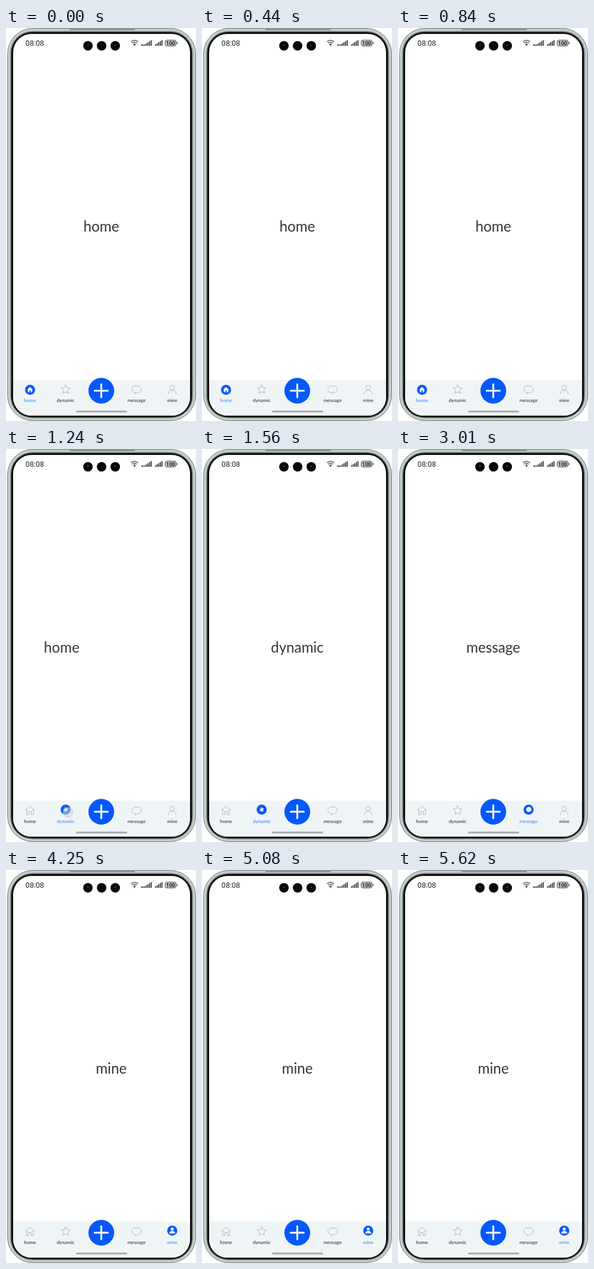
An HTML page for the animation above (5700 ms loop, 320 by 662 pixels).

```html
<!DOCTYPE html>
<html lang="en">
<head>
<meta charset="utf-8">
<title>Tab bar</title>
<style>
  html, body { margin: 0; width: 100%; height: 100%; overflow: hidden; background: #fff; }
  svg { display: block; width: 320px; height: 662px; }
  text { font-family: Lato, sans-serif; text-anchor: middle; }
  .page { font-size: 24.2px; fill: #343537; }
  .label { font-size: 8.2px; fill: #222; }
  .off { fill: none; stroke: #a9adb0; stroke-width: .9; stroke-linejoin: round; stroke-linecap: round; }
  .on { display: none; fill: #fff; }
  .disc { fill: #0a59f7; }
  .active .on { display: inline; }
  .active .off { display: none; }
  .active .label { fill: #2486f5; }
</style>
</head>
<body>
<svg viewBox="0 0 320 662">
  <defs>
    <clipPath id="screen"><rect x="12" y="10" width="298" height="643" rx="31"/></clipPath>
  </defs>

  <!-- phone body -->
  <rect x="2.5" y=".5" width="317" height="661" rx="43" fill="#b3bebb" stroke="#7e8a87"/>
  <rect x="5" y="3" width="312" height="656" rx="40" fill="none" stroke="#c9d2cf" stroke-width="2"/>
  <rect x="7.5" y="5.5" width="307" height="651.5" rx="37" fill="#636a69"/>
  <rect x="9" y="7" width="304" height="648.5" rx="35" fill="#0b0c0c"/>
  <path d="M107 2.5H217" stroke="#6d7775" stroke-width="1.5"/>

  <g clip-path="url(#screen)">
    <rect x="12" y="10" width="298" height="643" fill="#fff"/>
    <g id="pages"></g>
    <rect x="12" y="592.5" width="298" height="61" fill="#eff4f7"/>
  </g>

  <!-- status bar -->
  <text x="48.5" y="30" style="font:12.6px Roboto, sans-serif" fill="#252525">08:08</text>
  <g id="cameras"></g>
  <g fill="none" stroke="#333" stroke-width="1.3">
    <path d="M210.5 23.2Q216.5 18.2 222.500 23.2M212.600 25.600Q216.500 22.300 220.400 25.600M214.600 27.800Q216.500 26.200 218.400 27.800"/>
    <circle cx="216.500" cy="29.300" r=".5"/>
  </g>
  <g id="signal" fill="#333"></g>
  <rect x="268" y="20.300" width="18.500" height="10" rx="3" fill="#c4c6c7" stroke="#555"/>
  <path d="M288.300 23.500V27" stroke="#555" stroke-width="1.300"/>
  <text x="277.300" y="28.500" style="font:bold 9px Roboto, sans-serif" fill="#222">100</text>

  <!-- tabs -->
  <g class="tab" transform="translate(40.500 609)">
    <path class="off" d="M-7.500 -.5L0 -7.300L7.500 -.5M-5.700 -2V7H-2.200V1.500H2.200V7H5.700V-2"/>
    <g class="on" transform="translate(0 .5)">
      <circle class="disc" r="8.500"/>
      <path d="M-5 0L0 -4.700L5 0H3.700V4H1.200V1H-1.200V4H-3.700V0Z"/>
    </g>
  </g>
  <g class="tab" transform="translate(100.500 609)">
    <path class="off star" data-r="7.800"/>
    <g class="on" transform="translate(0 -1.500)">
      <circle class="disc" r="8.500"/>
      <path class="star" data-r="4.500" transform="rotate(-12)"/>
    </g>
  </g>
  <g class="tab" transform="translate(220 609)">
    <path class="off" d="M-2.500 5.200C-10 4.500 -10 -6 -1.500 -6H1.500C10 -6 10 5.200 1.500 5.200L-2 7.300Z"/>
    <g class="on" transform="translate(0 -1.500)">
      <circle class="disc" r="8.500"/>
      <circle cx=".3" cy="-.3" r="4.400" fill="#eaf1fd"/>
    </g>
  </g>
  <g class="tab" transform="translate(280 609)">
    <path class="off" d="M-3.700 -3.200a3.700 3.700 0 1 1 7.400 0a3.700 3.700 0 1 1 -7.400 0M-6.500 7.200C-6.500 -.8 6.500 -.8 6.500 7.200"/>
    <g class="on" transform="translate(0 -1.500)">
      <circle class="disc" r="8.500"/>
      <circle cy="-2.700" r="2.500"/>
      <path d="M-5 4.800C-5 -1 5 -1 5 4.800Z"/>
    </g>
  </g>

  <circle id="touch" r="8" fill="#d8dadb" fill-opacity=".5" stroke="#b9bcbe" stroke-width=".8"/>

  <circle cx="160.500" cy="611" r="21.700" fill="#0558fb"/>
  <path d="M149.500 611H171.500M160.500 600V622" stroke="#fff" stroke-width="3.200" stroke-linecap="round"/>
  <path d="M119.500 646H202.500" stroke="#a4a9ac" stroke-width="3" stroke-linecap="round"/>
</svg>

<script>
const LOOP = 5700, PAGE = 298, SLIDE = 300, PRESS = 40, TOUCH = 160;
const names = ['home', 'dynamic', 'message', 'mine'];
const taps = [1160, 2440, 4010];   // each tap opens the next tab
const tabX = [40.5, 100.5, 220, 280];

const pages = document.getElementById('pages');
const touch = document.getElementById('touch');
const tabs = [...document.querySelectorAll('.tab')];

function add(parent, tag, attrs, content = '') {
  const node = document.createElementNS('http://www.w3.org/2000/svg', tag);
  for (const key in attrs) node.setAttribute(key, attrs[key]);
  node.textContent = content;
  return parent.appendChild(node);
}

names.forEach((name, i) => {
  add(pages, 'text', { class: 'page', x: 160.5 + i * PAGE, y: 343 }, name);
  add(tabs[i], 'text', { class: 'label', y: 20.6 }, name);
});

document.querySelectorAll('.star').forEach(star => {
  const points = Array.from({ length: 10 }, (_, i) => {
    const r = star.dataset.r * (i % 2 ? 0.5 : 1), a = (i / 5 - 0.5) * Math.PI;
    return `${r * Math.cos(a)} ${r * Math.sin(a)}`;
  });
  star.setAttribute('d', `M${points.join('L')}Z`);
});

const cameras = document.getElementById('cameras');
[138, 161, 184].forEach((cx, i) => {
  add(cameras, 'circle', { cx, cy: 30, r: 8, fill: '#050606' });
  if (i !== 1) add(cameras, 'circle', { cx, cy: 29, r: 1.5, fill: '#1f4f4c' });
});

const signal = document.getElementById('signal');
const bar = (x, h) => add(signal, 'rect', { x, y: 30 - h, width: 1.7, height: h });
for (let i = 0; i < 5; i++) {
  bar(233 + i * 2.7, 2.5 + i * 1.8);
  bar(251 + i * 2.7, 2.5 + i * 1.8);
}
bar(228, 2.5);
bar(230.4, 2);

// cubic-bezier(.2, 0, .1, 1)
function ease(x) {
  if (x <= 0 || x >= 1) return x <= 0 ? 0 : 1;
  let lo = 0, hi = 1;
  for (let i = 0; i < 20; i++) {
    const s = (lo + hi) / 2, q = 1 - s;
    if (0.6 * q * q * s + 0.3 * q * s * s + s ** 3 < x) lo = s; else hi = s;
  }
  return lo * lo * (3 - 2 * lo);
}

function draw(now) {
  const t = now % LOOP;
  const position = taps.reduce((sum, tap) => sum + ease((t - tap - PRESS) / SLIDE), 0);
  pages.setAttribute('transform', `translate(${-PAGE * position} 0)`);

  const current = taps.filter(tap => t >= tap + PRESS).length;
  tabs.forEach((tab, i) => tab.classList.toggle('active', i === current));

  const pressed = taps.findIndex(tap => t >= tap && t < tap + TOUCH);
  touch.style.display = pressed < 0 ? 'none' : '';
  if (pressed >= 0) {
    touch.setAttribute('cx', tabX[pressed + 1] + 4);
    touch.setAttribute('cy', 612);
  }
}

const start = performance.now();
function tick() {
  draw(performance.now() - start);
  requestAnimationFrame(tick);
}
tick();
</script>
</body>
</html>
```
